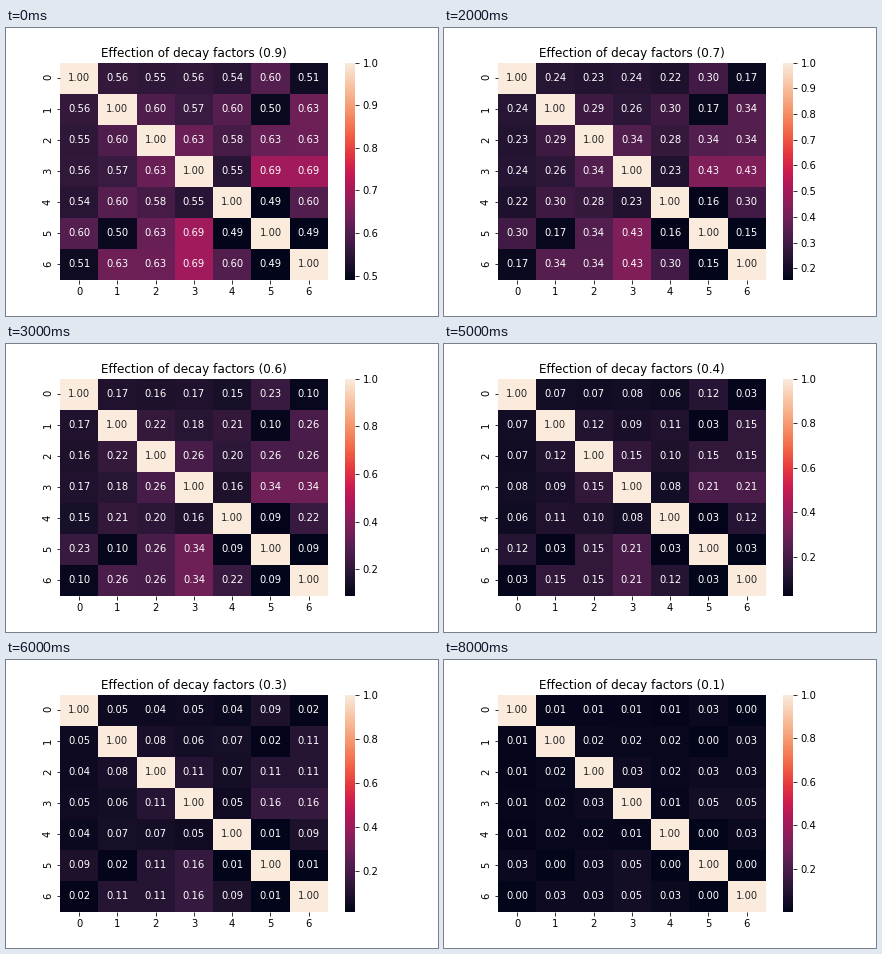
Write a matplotlib script that moves like this. It is 432 px wide and 288 px high and loops after 9000 ms.

```python
import numpy as np
import matplotlib.pyplot as plt
from matplotlib.animation import FuncAnimation
from matplotlib.colors import LinearSegmentedColormap

plt.rcParams.update({"font.family": "DejaVu Sans", "font.size": 10})

N = 7
LINKS = {0: (1, 2, 3, 4, 6), 1: (0,), 2: (0, 1), 3: (1, 2, 4),
         4: (0, 2, 3, 5), 5: (0, 4), 6: (4,)}

# Dark violet to cream, through magenta and orange
STOPS = [
    (0, (0.0106, 0.0181, 0.1002)),
    (4 / 255, (0.0276, 0.0282, 0.1148)),
    (10 / 255, (0.0619, 0.0450, 0.1380)),
    (1 / 9, "#2a1636"),
    (1 / 7, (0.2097, 0.0975, 0.2424)),
    (1 / 5, "#4c1d4b"),
    (2 / 9, "#551e4f"),
    (2 / 7, (0.4386, 0.1218, 0.3412)),
    (1 / 3, "#841e5a"),
    (2 / 5, "#a11a5b"),
    (3 / 7, (0.6782, 0.0919, 0.3504)),
    (1 / 2, "#cb1b4f"),
    (4 / 7, (0.8833, 0.1983, 0.2601)),
    (3 / 5, "#e83f3f"),
    (2 / 3, "#f06043"),
    (5 / 7, (0.9538, 0.4637, 0.3177)),
    (4 / 5, "#f69c73"),
    (6 / 7, (0.9652, 0.7078, 0.5607)),
    (8 / 9, "#f6c09f"),
    (1, (0.9814, 0.9206, 0.8654)),
]
CMAP = LinearSegmentedColormap.from_list("ember", STOPS, N=256)


def simrank(decay, steps=200):
    """Similarity of nodes whose incoming neighbours are similar."""
    w = np.zeros((N, N))
    for src, targets in LINKS.items():
        w[list(targets), src] = 1
    w /= w.sum(axis=1, keepdims=True)
    s = np.eye(N)
    for _ in range(steps):
        s = decay * w @ s @ w.T
        np.fill_diagonal(s, 1)
    return s


DECAYS = [d / 10 for d in range(9, 0, -1)]
SCORES = [simrank(d) for d in DECAYS]

fig, ax = plt.subplots(figsize=(6, 4), dpi=72, facecolor="white")
fig.subplots_adjust(left=0.125, right=0.9, bottom=0.125, top=0.88)

mesh = ax.pcolormesh(SCORES[0], cmap=CMAP, vmin=SCORES[0].min(), vmax=1)
ax.set(xlim=(0, N), ylim=(N, 0))
ax.spines[:].set_visible(False)
centers = np.arange(N) + 0.5
ax.set_xticks(centers, range(N))
ax.set_yticks(centers, range(N), rotation="vertical")

bar = fig.colorbar(mesh, ax=ax)
bar.outline.set_linewidth(0)

title = ax.set_title("")
labels = {
    (r, c): ax.text(c + 0.5, r + 0.5, "", ha="center", va="center",
                    color="0.15" if r == c else "white")
    for r in range(N) for c in range(N)
}


def update(i):
    s = SCORES[i]
    mesh.set_array(s)
    mesh.set_clim(s.min(), 1)
    for cell, label in labels.items():
        label.set_text(f"{s[cell]:.2f}")
    title.set_text(f"Effection of decay factors ({DECAYS[i]:.1f})")
    return [mesh, title, *labels.values()]


anim = FuncAnimation(fig, update, frames=len(DECAYS), interval=1000,
                     repeat=True, repeat_delay=0, blit=False)
plt.show()
```
